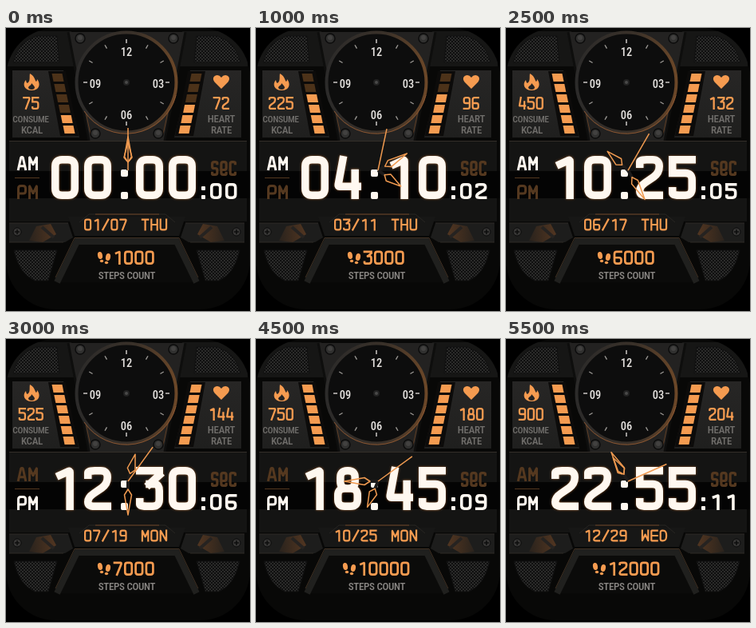
An HTML page that plays this animation: 306 by 354 pixels, repeating every 6000 ms.

```html
<!DOCTYPE html>
<html lang="en">
<head>
<meta charset="utf-8">
<title>Watch face</title>
<style>
  html, body { margin: 0; width: 100%; height: 100%; overflow: hidden; background: #000; }
  svg { display: block; width: 306px; height: 354px; }
  text { font-family: "Roboto Condensed", Roboto, "Open Sans Condensed", "Open Sans", sans-serif;
    font-stretch: 75%; font-weight: 500; text-anchor: middle; }
  .label { fill: #706e6b; font-size: 13px; letter-spacing: -.3px; }
  .hour { fill: #e4e1de; font-size: 16px; }
  .ink { fill: none; stroke-linecap: square; stroke-linejoin: round; }
  .hot { stroke: #f59b50; }
  .white { stroke: #fff8f0; }
  .dim { stroke: #54381f; }
  .hand { fill: none; stroke: #f09a50; stroke-width: 1.5; stroke-linejoin: round; }
  .stem { stroke: #1d1b1a; stroke-width: 4; }
  .icon { fill: #f59b50; }
  .big { filter: drop-shadow(0 0 1.5px rgba(240, 140, 60, .55)); }
</style>
</head>
<body>
<svg viewBox="0 0 306 354" role="img">
  <defs>
    <clipPath id="face"><rect width="306" height="352" rx="62"/></clipPath>
    <pattern id="mesh" width="4" height="4" patternUnits="userSpaceOnUse">
      <rect width="4" height="4" fill="#2b2b2a"/>
      <circle cx="1" cy="1" r="1.05" fill="#0a0a0a"/>
      <circle cx="3" cy="3" r="1.05" fill="#0a0a0a"/>
    </pattern>
    <linearGradient id="plate" x2="0" y2="1">
      <stop stop-color="#272625"/><stop offset="1" stop-color="#1f1f1e"/>
    </linearGradient>
    <linearGradient id="leaf">
      <stop stop-color="#2a231d"/><stop offset="1" stop-color="#523621"/>
    </linearGradient>
    <linearGradient id="rim" x1="0" x2="1">
      <stop stop-color="#2c2b2a"/><stop offset=".6" stop-color="#3a3129"/><stop offset="1" stop-color="#6b4728"/>
    </linearGradient>
    <g id="half">
      <path d="M0 48V4H82L90 48Z" fill="#161615"/>
      <path d="M9 43Q14 18 38 10H64L67 43Z" fill="url(#mesh)" stroke="#101010"/>
      <path d="M8 53H72L92 137H8Z" fill="url(#plate)"/>
      <path d="M53 54H75L91 135H68Z" fill="#0c0b0a"/>
      <path d="M78 5H152V141H104Z" fill="#232221"/>
      <path d="M78 5L104 141" stroke="#0e0e0d" stroke-width="3"/>
      <path d="M92 68L106 133" stroke="#5e3d23"/>
      <path d="M4 244H78L84 262 74 268H4Z" fill="#1d1d1c"/>
      <path d="M4 244H78M4 268H72" stroke="#2f2b27"/>
      <path d="M38 248L56 245 63 258 46 268 29 266Z" fill="url(#leaf)"/>
      <path d="M45 249L60 262" stroke="#262321" stroke-width="4"/>
      <circle cx="14" cy="255" r="5" fill="#373635" stroke="#0b0b0b"/>
      <path d="M11 255H17M14 252V258" stroke="#0c0c0c" stroke-width="1.5"/>
      <path d="M10 278H64L53 316H36Q16 307 10 278Z" fill="url(#mesh)" stroke="#101010"/>
    </g>
    <g id="bolts">
      <g fill="#30302f" stroke="#0c0c0c" stroke-width="1.5">
        <circle cx="93" cy="13" r="6"/><circle cx="112" cy="132" r="6"/>
      </g>
      <g fill="#424140"><circle cx="93" cy="12" r="3"/><circle cx="112" cy="131" r="3"/></g>
    </g>
  </defs>

  <g clip-path="url(#face)">
    <rect width="306" height="352" fill="#080807"/>
    <use href="#half"/>
    <use href="#half" transform="translate(303) scale(-1 1)"/>
    <rect x="4" y="141" width="298" height="101" fill="#141413"/>
    <path d="M4 141.5H302" stroke="#332e29"/>
    <rect y="179" width="306" height="34" fill="#040404"/>
    <path d="M78 236H225L217 260H86Z" fill="#171716"/>
    <path d="M92 243L104 233H200L212 243" fill="none" stroke="#282623"/>
    <path d="M112 233H192" stroke="#6b4324"/>
    <path d="M68 318L92 268H211L235 318Z" fill="#0b0b0a"/>
    <path d="M64 318L89 267H214L239 318" fill="none" stroke="#20201e" stroke-width="8"/>
    <path d="M62 312L86 262.5H217L241 312" fill="none" stroke="#3f3023"/>
    <use href="#bolts"/>
    <use href="#bolts" transform="translate(303) scale(-1 1)"/>
  </g>

  <circle cx="151" cy="68" r="62.5" fill="#0d0d0d" stroke="url(#rim)" stroke-width="4"/>
  <path d="M213 84A64 64 0 0 1 98 104" fill="none" stroke="#8a5530"/>
  <g id="ticks"></g>
  <circle cx="151" cy="68" r="3" fill="#4a4a49" stroke="#222" stroke-width="2"/>
  <text class="hour" x="151" y="35" data-max="14">12</text>
  <text class="hour" x="191" y="75" data-max="14">03</text>
  <text class="hour" x="151" y="114" data-max="14">06</text>
  <text class="hour" x="112" y="75" data-max="14">09</text>

  <path class="icon" fill-rule="evenodd" d="M30 57C37 61 36 66 38 67Q39 66 39 64C44 70 42 78 32 78C23 78 20 70 25 65Q25 68 27 69C31 66 29 61 30 57ZM32 69C32 72 28 72 28 75Q29 77 32 77Q36 77 36 74Q35 72 32 69Z"/>
  <path class="icon" d="M270 76L261.500 67.500C258 63 261 59 265 59Q268 59 270 62Q272 59 275 59C279 59 282 63 278.500 67.500Z"/>
  <g id="bars"></g>

  <text class="label" x="31" y="118" data-max="46">CONSUME</text>
  <text class="label" x="32.5" y="132" data-max="28">KCAL</text>
  <text class="label" x="270" y="118" data-max="35">HEART</text>
  <text class="label" x="270" y="132" data-max="28">RATE</text>
  <text class="label" x="151.5" y="314" data-max="72" style="fill:#8a8784">STEPS COUNT</text>

  <path d="M11 187.5H42" stroke="#54381f"/>
  <g id="bigInk" class="big"></g>
  <g id="ink"></g>
  <g fill="#fff8f0">
    <rect x="144" y="177" width="9" height="9" rx="2"/><rect x="144" y="205" width="9" height="9" rx="2"/>
    <rect x="245" y="198" width="5" height="5" rx="1"/><rect x="245" y="209" width="5" height="5" rx="1"/>
  </g>

  <g id="feet" class="icon">
    <ellipse cx="118" cy="284.500" rx="3" ry="4.500" transform="rotate(-10 118 284.500)"/>
    <ellipse cx="120" cy="291.500" rx="2.200" ry="1.800"/>
    <ellipse cx="128" cy="286.500" rx="3" ry="4.500" transform="rotate(10 128 286.500)"/>
    <ellipse cx="126" cy="293.500" rx="2.200" ry="1.800"/>
  </g>

  <g transform="translate(153 178)">
    <g id="hourHand"><path class="stem" d="M0 0V-11"/><path class="hand" d="M0-10L5-16 0-35-5-16Z"/></g>
    <g id="minuteHand"><path class="stem" d="M0 0V-11"/><path class="hand" d="M0-10L4.5-17 0-42-4.5-17Z"/></g>
    <path id="secondHand" class="hand" d="M0 0V-53"/>
  </g>
</svg>

<script>
const NS = 'http://www.w3.org/2000/svg';
const STEP = 500, COUNT = 12;
const $ = id => document.getElementById(id);

// Strokes on an 8 x 8 grid: xy pairs, "z" closes the stroke
const GLYPHS = {
  0: '00808808z', 1: '216068', 2: '01008083060888', 3: '0080 8143 4383880807',
  4: '200686 7378', 5: '8000 0003 0383880807', 6: '800008888404', 7: '00808138',
  8: '10707414z 04848808z', 9: '840400808808', '/': '8008',
  A: '08305088 1676', D: '006082866808z', E: '80000888 0484', H: '0008 8088 0484',
  M: '0800458088', N: '08008880', O: '00808808z', P: '0800808505',
  S: '8180000484880807', T: '0080 4048', U: '00088880', W: '0008438880',
  s: '8180000484880807', e: '05858000088887', c: '818000088887'
};
const SHARP = /[AEMNW147]/;

function toward(a, b, r) {
  const f = Math.min(.5, r / Math.hypot(b[0] - a[0], b[1] - a[1]));
  return [a[0] + (b[0] - a[0]) * f, a[1] + (b[1] - a[1]) * f];
}

// Polyline with rounded corners
function rounded(pts, closed, r) {
  const n = pts.length;
  let d = closed ? '' : 'M' + pts[0];
  for (let i = closed ? 0 : 1; i < (closed ? n : n - 1); i++) {
    const p = pts[i];
    const a = toward(p, pts[(i + n - 1) % n], r), b = toward(p, pts[(i + 1) % n], r);
    d += (d ? 'L' : 'M') + a + 'Q' + p + ' ' + b;
  }
  return d + (closed ? 'Z' : 'L' + pts[n - 1]);
}

function glyph(ch, x, y, w, h, sw) {
  const r = w * (SHARP.test(ch) ? .06 : .25);
  return GLYPHS[ch].split(' ').map(s => {
    const pts = s.replace('z', '').match(/../g).map(([u, v]) => [
      x + sw / 2 + u / 8 * (w - sw), y + sw / 2 + v / 8 * (h - sw)
    ]);
    return rounded(pts, s.endsWith('z'), r);
  }).join('');
}

function add(parent, tag, attrs) {
  const el = document.createElementNS(NS, tag);
  for (const k in attrs) el.setAttribute(k, attrs[k]);
  return parent.appendChild(el);
}

// A line of drawn characters; returns its setter
function line(cls, y, w, h, gap, sw, layer = 'ink') {
  const el = add($(layer), 'path', { class: 'ink ' + cls, 'stroke-width': sw });
  const set = (str, x) => el.setAttribute('d',
    [...str].map((c, i) => glyph(c, x + i * (w + gap), y, w, h, sw)).join(''));
  set.mid = (str, cx) => set(str, cx - (str.length * (w + gap) - gap) / 2);
  set.tone = name => el.setAttribute('class', 'ink ' + name);
  return set;
}

const hours = line('white', 160, 34, 54, 7, 9.5, 'bigInk');
const minutes = line('white', 160, 34, 54, 7, 9.5, 'bigInk');
const seconds = line('white', 194, 14.5, 20, 4.5, 3.6);
const am = line('white', 160, 12, 18, 2, 3);
const pm = line('dim', 196, 12, 18, 2, 3);
const sec = line('dim', 166, 9.5, 19, 1.8, 3.2);
const kcal = line('hot', 86, 9.4, 16, 1.5, 2.3);
const heart = line('hot', 86, 9.4, 16, 1.5, 2.3);
const date = line('hot', 238.5, 9.2, 15, 1.9, 2.2);
const day = line('hot', 238.5, 9.6, 15, 1.8, 2.2);
const steps = line('hot', 278.5, 11.2, 17.5, 2.1, 2.7);
am('AM', 14);
pm('PM', 14);
sec('sec', 257);

for (let i = 0; i < 12; i++) {
  add($('ticks'), 'path', {
    d: 'M0-49V-54', stroke: i % 3 ? '#9a9793' : '#d8d5d2',
    'stroke-width': 1.4, transform: `translate(151 68) rotate(${i * 30})`
  });
}

// Level bars, lowest first
function meter(mirror) {
  const g = add($('bars'), 'g', mirror ? { transform: 'translate(303) scale(-1 1)' } : {});
  const bars = [0, 1, 2, 3, 4, 5].map(i => add(g, 'path', {
    d: `M${71.5 - i * 2.8} 122h13l2 10h-13z`, transform: `translate(0 ${-13 * i})`
  }));
  return n => bars.forEach((b, i) => b.setAttribute('fill', i < n ? '#f59b50' : '#4c3219'));
}
const kcalBars = meter(false), heartBars = meter(true);

// Lower the type size where no condensed face is at hand
document.querySelectorAll('text').forEach(t => {
  let size = parseFloat(getComputedStyle(t).fontSize);
  while (size > 8 && t.getComputedTextLength() > +t.dataset.max + 1) {
    t.style.fontSize = (size -= .5) + 'px';
  }
});

const two = n => String(n).padStart(2, '0');
const turn = (id, deg) => $(id).setAttribute('transform', `rotate(${deg})`);

function show(k) {
  const h = k * 2, m = k * 5, month = k + 1, dom = 7 + k * 2;
  const week = 'SUN MON TUE WED THU FRI SAT'.split(' ');
  const name = week[new Date(2021, k, dom).getDay()];
  const total = String(month * 1000);

  hours(two(h), 57);
  minutes(two(m), 163);
  seconds(two(k), 256);
  am.tone(h < 12 ? 'white' : 'dim');
  pm.tone(h < 12 ? 'dim' : 'white');
  date(two(month) + '/' + two(dom), 98);
  day.mid(name, 186);
  kcal.mid(String(75 * month), 31.3);
  heart.mid(String(72 + 12 * k), 269.8);
  kcalBars(2 + k);
  heartBars(3 + Math.ceil(k / 2));
  steps.mid(total, 160.2);
  $('feet').setAttribute('transform', `translate(${(4 - total.length) * 6} 0)`);

  turn('hourHand', h * 30 + m / 2);
  turn('minuteHand', m * 6);
  turn('secondHand', k * 6);
  document.querySelector('svg').setAttribute('aria-label',
    `${two(h)}:${two(m)}:${two(k)}, ${two(month)}/${two(dom)} ${name}, ${total} steps`);
}

const start = performance.now();
let shown = -1;
function tick() {
  const k = Math.floor((performance.now() - start) / STEP) % COUNT;
  if (k !== shown) show(shown = k);
  requestAnimationFrame(tick);
}
tick();
</script>
</body>
</html>
```
